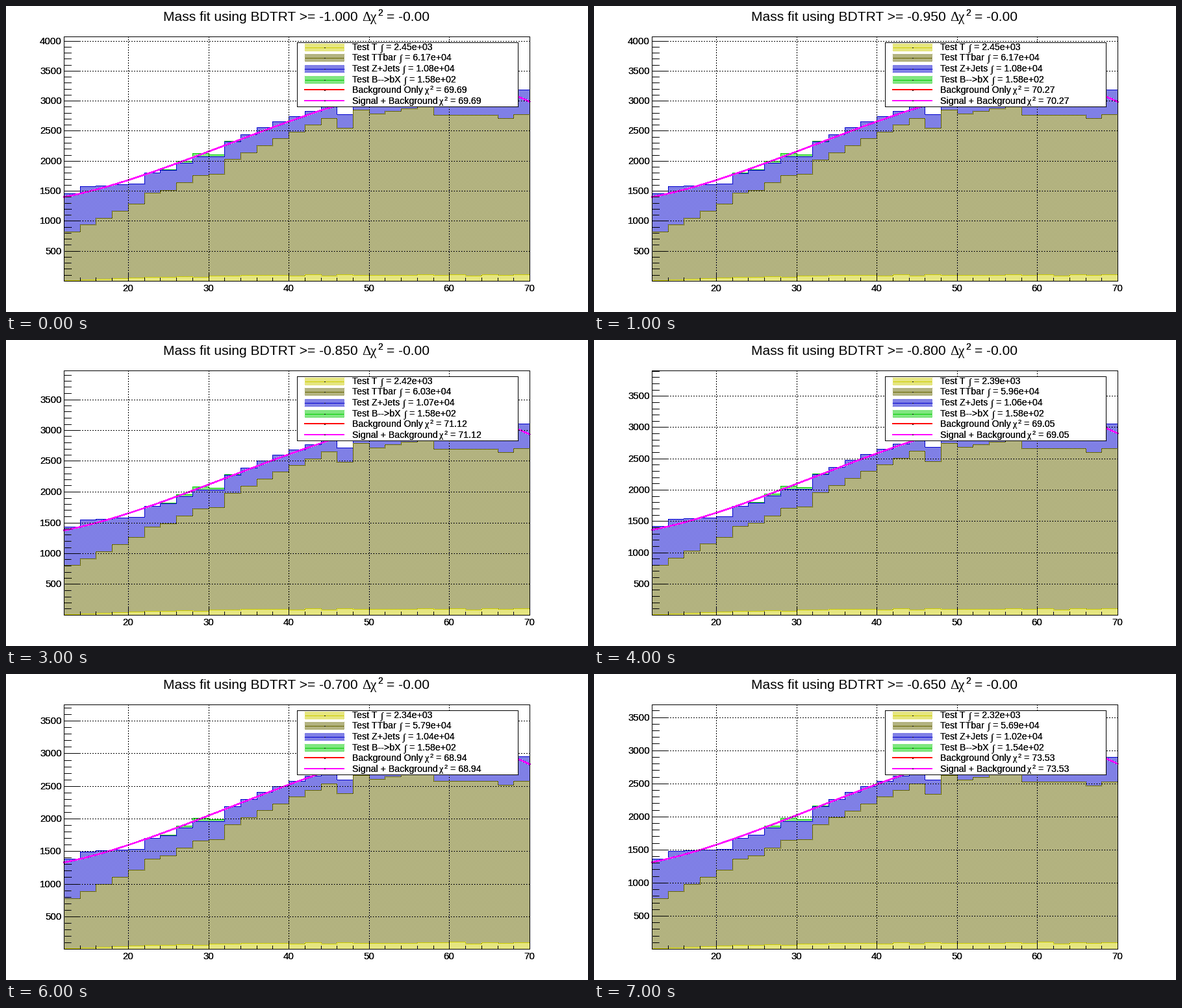
Write a matplotlib script that moves like this. It is 896 px wide and 472 px high and loops after 8000 ms.

```python
import numpy as np
import matplotlib.pyplot as plt
from matplotlib.animation import FuncAnimation
from matplotlib.patches import Rectangle

W, H, DPI = 896, 472, 64
PT = 72 / DPI                       # points per pixel
LEFT, RIGHT, TOP, BASE = 89, 806, 47, 424
SANS = ["Liberation Sans", "DejaVu Sans"]
SERIF = ["Liberation Serif", "DejaVu Serif"]

# per cut: share of the final event loss, px per 1000 events, fit quality
LOSS = [0, 0.005, 0.08, 0.285, 0.44, 0.6, 0.8, 1]
ZOOM = [92.6, 92.6, 93.1, 95.0, 96.5, 97.9, 100.5, 102.1]
CHI2 = [69.69, 70.27, 71.73, 71.12, 69.05, 66.88, 68.94, 73.53]

# name, x of the integral sign, colour, total events, final loss, loss power
SAMPLES = [("Test T", 577, (204, 204, 0), 2454, 0.0557, 1),
           ("Test TTbar", 606, (102, 102, 0), 61700, 0.0778, 1),
           ("Test Z+Jets", 611, (0, 0, 204), 10765, 0.049, 1.25),
           ("Test B-->bX", 613, (0, 204, 0), 158.2, 0.025, 12)]

# cumulative bin heights of the stack, bottom to top
BINS = np.arange(29)
rng = np.random.default_rng(4)
t_top = 105 * (1 - np.exp(-(BINS + 0.5) / 6.5)) + rng.normal(0, 7, 29) * (BINS > 4)
tt_top = np.interp(
    BINS, [0, 4, 5, 6, 8, 9, 10, 13, 16, 17, 18, 19, 22, 23, 26, 27, 28],
    [820, 1285, 1465, 1515, 1765, 1785, 2025, 2375, 2710, 2545, 2850, 2785,
     2920, 2765, 2765, 2710, 2775])
z_top = tt_top + np.interp(BINS, [0, 1, 4, 7, 9, 12, 16, 28],
                           [635, 640, 335, 330, 292, 300, 215, 410])
b_top = z_top + 50 * np.exp(-((13 + 2 * BINS - 29) / 3) ** 2)
STACK = [t_top, tt_top, z_top, b_top]

EDGES = np.round(LEFT + np.arange(30) * (RIGHT - LEFT) / 29)
FIT = np.polynomial.Polynomial.fit(
    [12, 20, 30, 40, 45, 57, 68.6, 70],
    [1400, 1680, 2160, 2650, 2890, 3250, 3070, 2985], 5)

# checkered fill of each sample on white
rows, cols = np.mgrid[0:H, 0:W]
CHECK = ((rows + cols) % 2 == 0)[..., None]
FILLS = [np.where(CHECK, s[2], 255).astype(np.uint8) for s in SAMPLES]
COLORS = [tuple(c / 255 for c in s[2]) for s in SAMPLES]

fig = plt.figure(figsize=(W / DPI, H / DPI), dpi=DPI, facecolor="white")
ax = fig.add_axes([0, 0, 1, 1])


def x_px(v):
    return LEFT + (v - 12) * (RIGHT - LEFT) / 58


def line(xs, ys, color="black", width=1, z=3, **kw):
    # the small offset makes snapping pick exactly this pixel
    ax.plot(np.asarray(xs) + 0.25, np.asarray(ys) + 0.25, color=color,
            lw=width * PT, antialiased=False, zorder=z, **kw)


def text(x, y, s, size, family=SANS, ha="left"):
    # small text is laid down twice for a heavier weight
    for _ in range(2 if size < 18 else 1):
        ax.text(x, y, s, fontsize=size * PT, family=family, ha=ha,
                va="baseline", color="black", zorder=9)


def image(pixels, x0, y0, z):
    h, w = pixels.shape[:2]
    ax.imshow(pixels, extent=(x0, x0 + w, y0 + h, y0), aspect="auto",
              interpolation="nearest", zorder=z)


def chi2(x, y, size, step):
    text(x, y, "χ", size, SERIF)
    text(x + step, y - 0.38 * size, "2", 0.66 * size)


def histograms(zoom, scale):
    img = np.full((H, W, 3), 255, np.uint8)
    column = np.clip(np.searchsorted(EDGES, np.arange(W), "right") - 1, 0, 28)
    inside = (cols >= LEFT) & (cols <= RIGHT) & (rows <= BASE)
    for counts, fill, color in list(zip(STACK, FILLS, COLORS))[::-1]:
        tops = np.round(BASE - counts * scale * zoom / 1000)
        area = inside & (rows >= tops[column])
        img[area] = fill[area]
        line(np.repeat(EDGES, 2)[1:-1], np.repeat(tops, 2), color)
    image(img, 0, 0, 1)


def axes_and_grid(zoom):
    dots = dict(linestyle=(0, (1, 2)), z=5)
    for v in range(100, int((BASE - TOP) / zoom * 1000) + 1, 100):
        y = round(BASE - v * zoom / 1000)
        major = v % 500 == 0
        line([LEFT, LEFT + (23 if major else 11)], [y, y], z=5)
        if major:
            line([LEFT, RIGHT], [y, y], **dots)
            text(86, y + 5, str(v), 15, ha="right")
    for v in range(12, 71, 2):
        x = round(x_px(v))
        major = v % 10 == 0
        line([x, x], [BASE, BASE - (11 if major else 5)], z=5)
        if major:
            line([x, x], [TOP, BASE], **dots)
            text(x, 440.5, str(v), 15, ha="center")
    line([LEFT, RIGHT, RIGHT, LEFT, LEFT], [TOP, TOP, BASE, BASE, TOP], z=5)


def legend(loss, chi):
    x0, x1, y0, y1 = 448, 788, 56, 155
    ax.add_patch(Rectangle((x0, y0), x1 - x0, y1 - y0, fc="white",
                           ec="none", zorder=6))
    line([x0, x1, x1, x0, x0], [y0, y0, y1, y1, y0], z=7)
    for i, (name, x, _, total, drop, power) in enumerate(SAMPLES):
        y = round(64 + 16.5 * i)
        image(FILLS[i][y - 6:y + 6, 460:521], 460, y - 6, 7)
        line([460, 520], [y, y], COLORS[i], z=8)
        text(533, y + 4, name, 14.1)
        text(x, y + 4, "∫", 14.1, SERIF)
        text(x + 8, y + 4, f"= {total * (1 - drop * loss ** power):.2e}", 14.1)
    for name, x, y, color in [("Background Only", 645, 129, "red"),
                              ("Signal + Background", 667, 146, "magenta")]:
        line([460, 520], [y, y], color, 2, 8)
        text(533, y + 5, name, 14.1)
        chi2(x, y + 5, 14.1, 7.5)
        text(x + 17, y + 5, f"= {chi:.2f}", 14.1)
    for i in range(6):
        y = round(64 + 16.5 * i)
        line([490, 491], [y, y], z=8.5, solid_capstyle="butt")


def title(cut):
    text(241.5, 23, f"Mass fit using BDTRT >= {cut:.3f}", 21)
    text(548, 23, "Δ", 21, SERIF)
    chi2(561, 23, 21, 11)
    text(586.5, 23, "= -0.00", 21)


def draw(i):
    loss, zoom = LOSS[i], ZOOM[i]
    ax.clear()
    ax.set_axis_off()
    histograms(zoom, 1 - loss * np.linspace(0.063, 0.089, 29))
    axes_and_grid(zoom)
    mass = np.linspace(12, 70, 101)
    fit = FIT(mass) * (1 - 0.063 * loss)
    line(x_px(mass), BASE - fit * zoom / 1000, "magenta", 1.5, 4)
    legend(loss, CHI2[i])
    title(-1 + 0.05 * i)
    ax.set_xlim(0, W)
    ax.set_ylim(H, 0)
    return []


anim = FuncAnimation(fig, draw, frames=len(LOSS), init_func=lambda: [],
                     interval=1000, repeat=True, repeat_delay=0)
plt.show()
```
